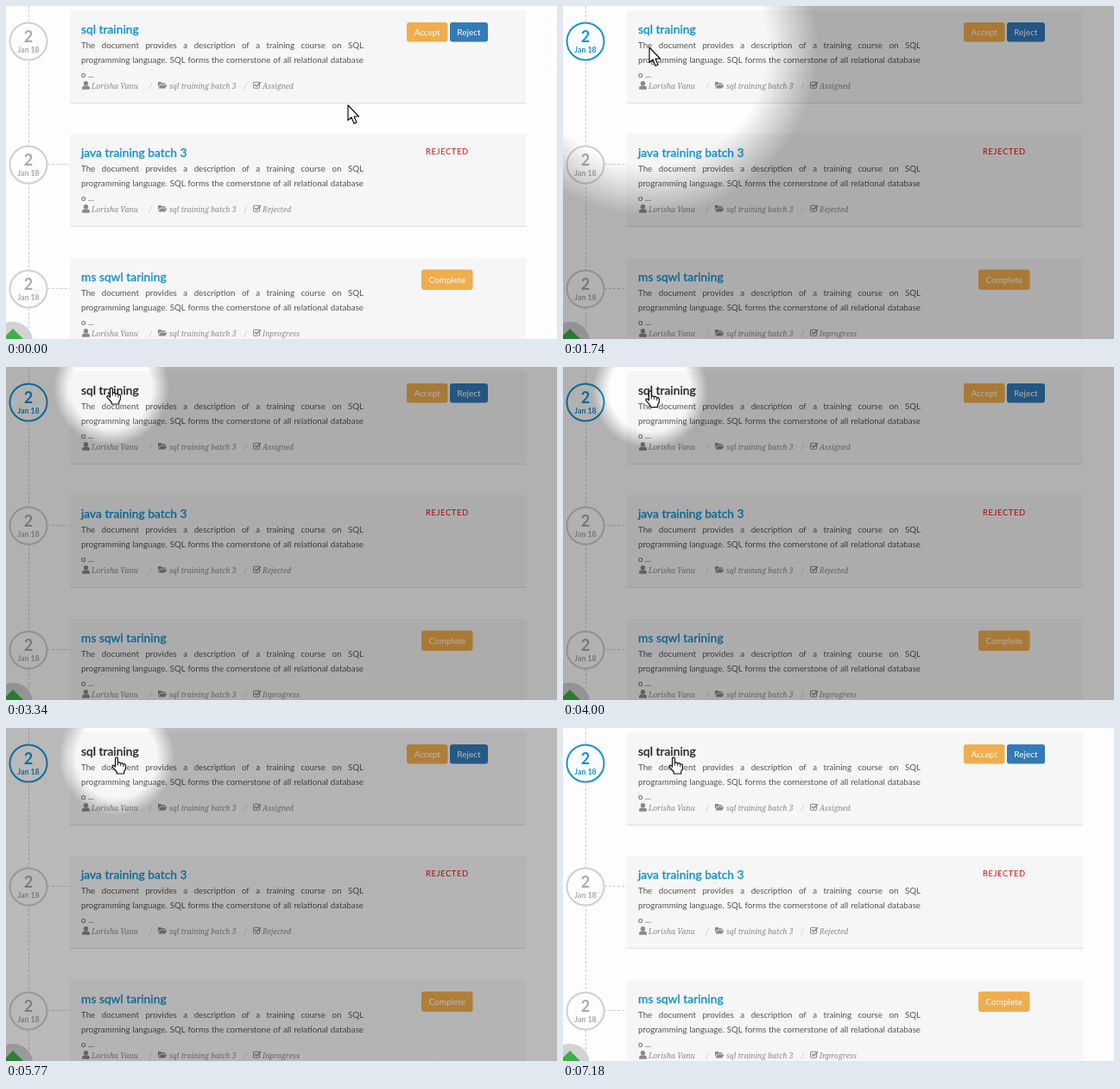
An HTML page with a canvas that plays this animation: 638x386 px, repeating every 7.71 s.

```html
<!DOCTYPE html>
<html lang="en">
<head>
<meta charset="utf-8">
<title>Training timeline</title>
<style>
html, body { margin: 0; width: 100%; height: 100%; overflow: hidden; background: #fdfdfd; }
canvas { display: block; }
</style>
</head>
<body>
<canvas id="stage" width="638" height="386"></canvas>
<script>
const ctx = document.getElementById("stage").getContext("2d");
const W = 638, H = 386, LOOP = 7710;
const SANS = "Lato, 'Open Sans', sans-serif";
const SERIF = "'Noto Serif', serif";
const BLUE = "#1594d2", GREY = "#8a8a8a";

const items = [
  { y: 0, title: "sql training", status: "Assigned" },
  { y: 143, title: "java training batch 3", status: "Rejected" },
  { y: 287, title: "ms sqwl tarining", status: "Inprogress" }
];

// Screen refreshes: [start, count], 130 ms apart inside a run
const runs = [[0, 1], [20, 3], [430, 1], [840, 1], [1440, 1], [1590, 1], [1740, 1],
  [1890, 3], [2300, 6], [3080, 6], [3860, 1], [4000, 3], [4400, 4], [4960, 3],
  [5380, 4], [7050, 2]];

// Pointer path: [time, x, y]
const path = [[0, 396, 115], [20, 290, 114], [280, 57, 112], [430, 105, 114],
  [1439, 105, 114], [1440, 69, 77], [1740, 100, 48], [2020, 128, 32], [2300, 139, 27],
  [2560, 120, 34], [2820, 102, 31], [3080, 94, 23], [3340, 122, 24], [3600, 138, 23],
  [3730, 135, 23], [3860, 119, 25], [4130, 84, 30], [4260, 80, 29], [4530, 132, 26],
  [4660, 150, 26], [4790, 147, 27], [5090, 113, 33], [5220, 105, 34], [5510, 112, 34],
  [5770, 128, 34]];

const dimKeys = [[1439, 0], [1440, 0.18], [1590, 0.25], [1740, 0.3], [4790, 0.3],
  [5220, 0.27], [7049, 0.27], [7050, 0.12], [7180, 0]];

function snap(t) {
  const [start, count] = runs.filter(r => r[0] <= t).pop();
  return start + 130 * Math.min(count - 1, Math.floor((t - start) / 130));
}

function keyed(keys, t, col = 1) {
  if (t <= keys[0][0]) return keys[0][col];
  for (let i = 1; i < keys.length; i++) {
    const a = keys[i - 1], b = keys[i];
    if (t <= b[0]) return a[col] + (b[col] - a[col]) * (t - a[0]) / (b[0] - a[0]);
  }
  return keys[keys.length - 1][col];
}

function mix(a, b, p) {
  return `rgb(${a.map((v, i) => Math.round(v + (b[i] - v) * p)).join(",")})`;
}

function text(str, x, y, font, color, align = "left") {
  ctx.font = font;
  ctx.fillStyle = color;
  ctx.textAlign = align;
  ctx.fillText(str, x, y);
}

function justified(str, x, y, width, font, color) {
  ctx.font = font;
  const words = str.split(" ");
  const sizes = words.map(w => ctx.measureText(w).width);
  const gap = (width - sizes.reduce((a, b) => a + b)) / (words.length - 1);
  words.forEach((w, i) => {
    text(w, x, y, font, color);
    x += sizes[i] + gap;
  });
}

function poly(points, x = 0, y = 0) {
  ctx.beginPath();
  points.forEach(([px, py]) => ctx.lineTo(x + px, y + py));
  ctx.closePath();
}

function disc(x, y, r, color) {
  ctx.fillStyle = color;
  ctx.beginPath();
  ctx.arc(x, y, r, 0, 7);
  ctx.fill();
}

function dashed(x1, y1, x2, y2) {
  ctx.strokeStyle = "#cfcfcf";
  ctx.lineWidth = 1;
  ctx.setLineDash([3, 2]);
  ctx.beginPath();
  ctx.moveTo(x1, y1);
  ctx.lineTo(x2, y2);
  ctx.stroke();
  ctx.setLineDash([]);
}

function button(label, x, y, w, h, color) {
  ctx.fillStyle = color;
  ctx.beginPath();
  ctx.roundRect(x, y, w, h, 3);
  ctx.fill();
  text(label, x + w / 2, y + h / 2 + 3.3, "10px " + SANS, "#fff", "center");
}

function userIcon(x, y) {
  disc(x + 4.5, y + 2.7, 2.7, GREY);
  ctx.beginPath();
  ctx.roundRect(x, y + 5.4, 9, 4.4, [3, 3, 1, 1]);
  ctx.fill();
}

function folderIcon(x, y) {
  ctx.fillStyle = GREY;
  poly([[0, 1], [3.5, 1], [4.5, 2.2], [8.5, 2.2], [8.5, 3.8], [2.5, 3.8], [0, 7]], x, y);
  ctx.fill();
  poly([[2.8, 4.6], [10.5, 4.6], [8.3, 8.6], [0.4, 8.6]], x, y);
  ctx.fill();
}

function checkIcon(x, y) {
  ctx.strokeStyle = GREY;
  ctx.lineWidth = 1.1;
  ctx.beginPath();
  ctx.roundRect(x + 0.6, y + 1.2, 7, 7, 1.4);
  ctx.stroke();
  ctx.lineWidth = 1.6;
  ctx.beginPath();
  ctx.moveTo(x + 2.2, y + 4);
  ctx.lineTo(x + 4.2, y + 6);
  ctx.lineTo(x + 9, y + 1.2);
  ctx.stroke();
}

function badge(y, glow) {
  const ring = mix([207, 207, 207], [21, 148, 210], glow);
  const ink = mix([170, 170, 170], [21, 148, 210], glow);
  disc(26, y + 41, 21.5, "#fdfdfd");
  ctx.strokeStyle = ring;
  ctx.lineWidth = 2;
  ctx.stroke();
  text("2", 26, y + 41.5, "bold 18px " + SANS, ink, "center");
  text("Jan 18", 26, y + 53.5, "bold 8.8px " + SANS, ink, "center");
}

function card(item, glow, hover) {
  const y = item.y, body = "9.75px " + SANS, meta = "italic 8.6px " + SERIF;
  ctx.fillStyle = "#f6f6f6";
  ctx.fillRect(74, y + 5, 528, 107);
  ctx.fillStyle = "#dedede";
  ctx.fillRect(74, y + 112, 528, 1);
  if (y) dashed(48, y + 40.5, 74, y + 40.5);
  badge(y, glow);

  const ink = hover ? "#2b2b2b" : BLUE;
  text(item.title, 87, y + 32, "500 13.8px " + SANS, ink);
  ctx.strokeStyle = ink;
  ctx.lineWidth = 0.3;
  ctx.strokeText(item.title, 87, y + 32);

  justified("The document provides a description of a training course on SQL",
    87, y + 49, 327, body, "#555");
  justified("programming language. SQL forms the cornerstone of all relational database",
    87, y + 66, 327, body, "#555");
  text("o ...", 87, y + 82.5, body, "#555");

  userIcon(88, y + 87);
  text("Lorisha Vanu", 99, y + 95.5, meta, GREY);
  text("/", 166, y + 95.5, meta, "#bbb");
  folderIcon(176, y + 87);
  text("sql training batch 3", 189, y + 95.5, meta, GREY);
  text("/", 276, y + 95.5, meta, "#bbb");
  checkIcon(286, y + 87);
  text(item.status, 297, y + 95.5, meta, GREY);
}

function page(glow, hover) {
  ctx.fillStyle = "#fdfdfd";
  ctx.fillRect(0, 0, W, H);
  dashed(26.5, 0, 26.5, H);
  items.forEach((item, i) => card(item, i ? 0 : glow, !i && hover));

  button("Accept", 464, 19, 47.5, 22.5, "#f0ad4e");
  button("Reject", 514, 19, 44, 22.5, "#337ab7");
  button("Complete", 481, 305.5, 59.5, 23.5, "#f0ad4e");
  ctx.letterSpacing = "0.6px";
  text("REJECTED", 486, 171.5, "500 9.4px " + SANS, "#f01c1c");
  ctx.letterSpacing = "0px";

  disc(8, 389, 23, "#d2d2d2");
  ctx.fillStyle = "#3fae49";
  poly([[8, 374], [21, 387], [-5, 387]]);
  ctx.fill();
}

function spotlight(x, y, r, dim) {
  const g = ctx.createRadialGradient(x, y, r * 0.7, x, y, r);
  g.addColorStop(0, "rgba(0,0,0,0)");
  g.addColorStop(0.5, `rgba(0,0,0,${dim * 0.5})`);
  g.addColorStop(1, `rgba(0,0,0,${dim})`);
  ctx.fillStyle = g;
  ctx.fillRect(0, 0, W, H);
}

function outlined() {
  ctx.fillStyle = "#fff";
  ctx.strokeStyle = "#111";
  ctx.lineWidth = 1.2;
  ctx.lineJoin = "round";
  ctx.fill();
  ctx.stroke();
}

function arrow(x, y) {
  poly([[0, 0], [0, 17.5], [4, 14], [7, 21.3], [10, 20], [7, 13], [12.5, 13]], x, y);
  outlined();
}

function hand(x, y) {
  poly([[-1.4, 1], [0, 0], [1.5, 1], [1.5, 6.5], [3, 5.8], [4.8, 7], [6.5, 6.6],
    [7.9, 8], [9.6, 7.9], [10.6, 9.5], [10.4, 13.5], [8.7, 16.5], [8.7, 19],
    [0.3, 19], [0.3, 17], [-5, 10.8], [-4.6, 9.3], [-3, 9.4], [-1.4, 11]], x, y);
  outlined();
  ctx.lineWidth = 0.9;
  ctx.beginPath();
  [[1.5, 6.5], [4.8, 7.2], [7.9, 8.3]].forEach(([px, py]) => {
    ctx.moveTo(x + px, y + py);
    ctx.lineTo(x + px, y + py + 3);
  });
  ctx.stroke();
}

function draw(now) {
  const t = snap(now % LOOP);
  const x = keyed(path, t), y = keyed(path, t, 2);
  const hover = t > 1440 && y < 37;
  const glow = t < 1440 ? 0 : Math.min(1, 0.15 + (t - 1440) / 350);
  page(glow, hover);

  const dim = keyed(dimKeys, t);
  const left = Math.max(0, 1 - (t - 1440) / 860);
  if (dim > 0) spotlight(x, y, 67 + 303 * left * left, dim);
  (hover ? hand : arrow)(x, y);
}

const begin = performance.now();
function tick() {
  draw(performance.now() - begin);
  requestAnimationFrame(tick);
}
tick();
</script>
</body>
</html>
```
